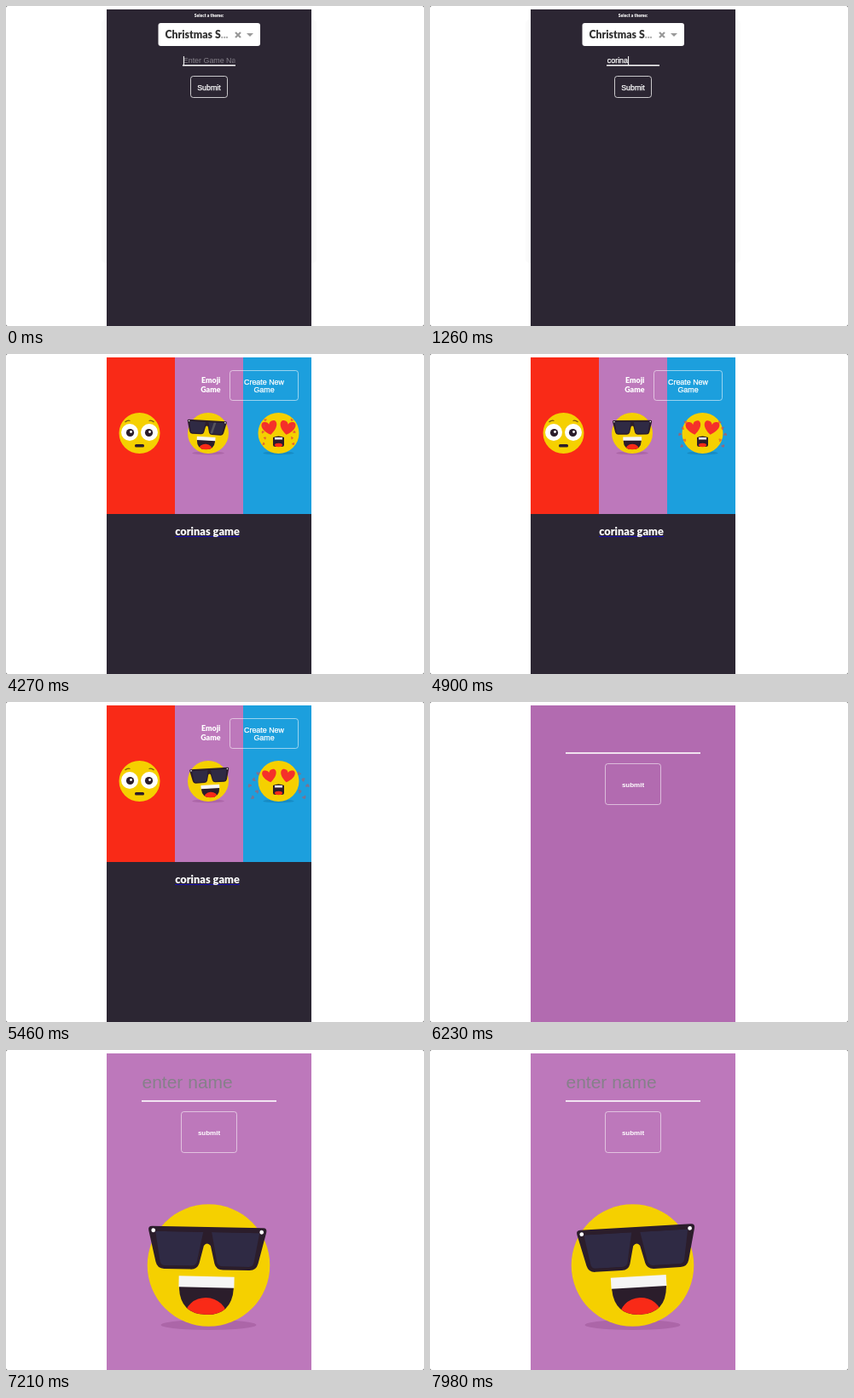
An HTML page that plays this animation: 490x376 px, repeating every 8000 ms.

```html
<!DOCTYPE html>
<html lang="en">
<head>
<meta charset="utf-8">
<title>Emoji game</title>
<style>
  html, body { margin: 0; width: 490px; height: 376px; overflow: hidden; background: #fff; }
  svg { display: block; }
  text { font-family: "Liberation Sans", Arial, sans-serif; font-size: 8.9px; fill: #fff; white-space: pre; }
  .ui { stroke: #fff; stroke-width: .25; }
  .round { font-family: Lato, "Open Sans", sans-serif; font-weight: 900; }
  .mid { text-anchor: middle; }
  .box { fill: none; stroke: #fff; }
</style>
</head>
<body>
<svg width="490" height="376" viewBox="0 0 490 376">
  <defs>
    <path id="lens" d="M-61-39H-5L-12-3Q-14 1-19 1H-49Q-54 1-55-4Z"/>
    <clipPath id="lenses">
      <use href="#lens"/>
      <use href="#lens" transform="scale(-1 1)"/>
    </clipPath>
    <clipPath id="mouth"><path d="M-32 24H32V27Q30 58 0 58T-32 27Z"/></clipPath>
    <clipPath id="bluePanel"><rect x="278" y="4" width="80" height="184"/></clipPath>
    <path id="heart" d="M0 8C-12 0-9-8-4.5-7Q-1-7 0-3.5Q1-7 4.5-7C9-8 12 0 0 8Z"/>

    <g id="cool">
      <ellipse cy="70" rx="56" ry="6" fill="#ac66a8"/>
      <circle r="71.8" fill="#f5d000"/>
      <g id="sway">
        <g clip-path="url(#mouth)">
          <rect x="-33" y="20" width="66" height="40" fill="#2b1d2b"/>
          <ellipse cy="61" rx="25" ry="23" fill="#f92a17"/>
        </g>
        <rect x="-32.5" y="13" width="65" height="13" fill="#f5f5f5"/>
        <path fill="#2b1d2b" d="M-65-45H65Q70-45 69-40L60-3Q58 5 50 5H19Q11 5 9-2L4-23Q0-28-4-23L-9-2Q-11 5-19 5H-50Q-58 5-60-3L-69-40Q-70-45-65-45Z"/>
        <g clip-path="url(#lenses)">
          <rect x="-70" y="-45" width="140" height="55" fill="#2f2a44"/>
          <path id="glint" fill="#55535c" d="M4-45H12L-3 8H-11Z"/>
        </g>
        <circle cx="-63.5" cy="-40" r="2.4" fill="#fff"/>
        <circle cx="63.5" cy="-40" r="2.4" fill="#fff"/>
      </g>
    </g>
  </defs>

  <g id="create">
    <rect x="112" y="16" width="252" height="286" rx="5" fill="#fbfbfb"/>
    <rect x="118" y="4" width="240" height="372" fill="#2c2633"/>
    <text class="round mid" x="238" y="13" style="font-size:5px">Select a theme:</text>
    <rect x="178.5" y="20" width="119.5" height="27" rx="3" fill="#fff"/>
    <text class="round" x="186.5" y="38" style="font-size:12.3px;fill:#333">Christmas S<tspan fill="#aaa">...</tspan></text>
    <path d="M269 31l6 6m0-6l-6 6" stroke="#999" stroke-width="2.2"/>
    <path d="M282 32h8l-4 4Z" fill="#999"/>
    <svg x="207" y="56" width="61.5" height="16" viewBox="207 56 61.5 16">
      <text id="hint" x="207.8" y="67" style="fill:#85818a">Enter Game Name</text>
      <text id="typed" class="ui" x="207.8" y="67"></text>
    </svg>
    <rect id="caret" y="59" width="1" height="10" fill="#fff"/>
    <rect x="207" y="69" width="62" height="1.5" fill="#fff"/>
    <rect class="box" x="216.5" y="82.5" width="43" height="25" rx="3" stroke-opacity=".75"/>
    <text class="ui mid" x="238" y="99">Submit</text>
  </g>

  <g id="home">
    <rect x="118" y="4" width="240" height="372" fill="#2c2633"/>
    <rect x="118" y="4" width="80" height="184" fill="#f92a17"/>
    <rect x="198" y="4" width="80" height="184" fill="#bd78bb"/>
    <rect x="278" y="4" width="80" height="184" fill="#1c9fdd"/>

    <g transform="translate(156.5 93)">
      <circle r="24" fill="#f5d000"/>
      <g fill="#fff"><circle cx="-11.5" cy="-1" r="10"/><circle cx="11.5" cy="-1" r="10"/></g>
      <g fill="#2b1d2b"><circle cx="-11" cy="-.5" r="4.6"/><circle cx="11" cy="-.5" r="4.6"/>
        <rect x="-5.5" y="13" width="11" height="3.6" rx="1.6"/></g>
      <g fill="#fff"><circle cx="-10" cy="-1.5" r="1.4"/><circle cx="12" cy="-1.5" r="1.4"/></g>
      <path d="M-17-13q3-2.5 6-1.500M17-13q-3-2.500-6-1.500" fill="none" stroke="#7a5a10" stroke-width="1.2"/>
    </g>

    <use href="#cool" transform="translate(237 93) scale(.334)"/>

    <g clip-path="url(#bluePanel)">
      <g transform="translate(319.5 93)">
        <ellipse cy="23.400" rx="18" ry="2" fill="#178bc4"/>
        <circle r="24" fill="#f5d000"/>
        <path d="M-6.500 5Q0 2 6.500 5V14Q6.500 16 4 16H-4Q-6.500 16-6.500 14Z" fill="#2b1d2b"/>
        <rect x="-4.500" y="5" width="9" height="2.500" fill="#f5f5f5"/>
        <ellipse cy="14" rx="4.500" ry="2.200" fill="#f92a17"/>
        <g id="eyes" fill="#f5302a"></g>
        <g id="sparks" fill="#e0453f"></g>
      </g>
    </g>

    <g class="round" text-anchor="end">
      <text class="round" x="251.500" y="33.500">Emoji</text>
      <text class="round" x="251.500" y="44.500">Game</text>
    </g>
    <rect class="box" x="262.500" y="19.500" width="80" height="35" rx="3" stroke-opacity=".55"/>
    <text class="ui mid" x="302.500" y="36">Create New</text>
    <text class="ui mid" x="302.500" y="45">Game</text>
    <path d="M198 214.500H274" stroke="#1a0fb0"/>
    <text class="round mid" x="236" y="213" style="font-size:12.800px">corinas game</text>
  </g>

  <g id="join">
    <rect id="joinBack" x="118" y="4" width="240" height="372"/>
    <g id="loaded">
      <text x="159.500" y="45" style="font-size:21px;fill:#86808a">enter name</text>
      <use href="#cool" transform="translate(237.500 253)"/>
    </g>
    <rect x="159" y="59.200" width="158" height="1.600" fill="#fff"/>
    <rect class="box" x="205.500" y="72.500" width="65" height="48" rx="3" stroke-opacity=".55"/>
    <text class="mid" x="238" y="100" style="font-size:8px;font-weight:bold">submit</text>
  </g>

  <path d="M0 0H2Q0 0 0 2ZM490 0V2Q490 0 488 0ZM0 376V374Q0 376 2 376ZM490 376H488Q490 376 490 374Z" fill="#555"/>
</svg>
<script>
  const LOOP = 8000, HOME = 4270, JOIN = 6230, LOADED = 6300, SWAY = 2480;
  const NAME = "corinas game";
  const KEYS = [280, 350, 700, 840, 1050, 1260, 1680, 1820, 1960, 2310, 2590, 2870];
  const SPARKS = 10;

  const $ = id => document.getElementById(id);
  const show = (id, on) => $(id).setAttribute("display", on ? "inline" : "none");
  const place = (el, transform) => el.setAttribute("transform", transform);

  function addHearts(parent, count) {
    return Array.from({ length: count }, () => {
      const heart = document.createElementNS("http://www.w3.org/2000/svg", "use");
      heart.setAttribute("href", "#heart");
      return $(parent).appendChild(heart);
    });
  }
  const eyes = addHearts("eyes", 2), sparks = addHearts("sparks", SPARKS);

  function drawCreate(t) {
    const count = KEYS.filter(k => k <= t).length;
    $("typed").textContent = NAME.slice(0, count);
    show("hint", !count);
    show("caret", t < 3360 || t >= 3920);
    $("caret").setAttribute("x", 207.9 + (count ? $("typed").getComputedTextLength() : 0));
  }

  function drawCool(t) {
    const turn = (t - 4250) / SWAY;
    const c = Math.cos(turn * 2 * Math.PI);
    place($("sway"), `translate(${-6 * c}) rotate(${3.3 * c})`);
    const sinceGlint = (turn - Math.round(turn)) * SWAY;
    place($("glint"), `translate(${16 + sinceGlint * 0.28})`);
  }

  function drawHearts(t) {
    const pulse = 1 + 0.06 * Math.cos((t - HOME) * Math.PI / 350);
    eyes.forEach((eye, i) => {
      const side = i ? 1 : -1;
      place(eye, `translate(${side * 10.5} -6.5) rotate(${side * 10}) scale(${pulse})`);
    });
    const p = ((t - HOME) / 2000 + 0.25) % 1;
    sparks.forEach((spark, i) => {
      const side = i % 2 ? 1 : -1, row = Math.floor(i / 2);
      const x = side * (12 + p * (14 + row * 4 % 11 * 1.5));
      const y = -16 + row * 7 + 10 * p * p;
      place(spark, `translate(${x} ${y}) rotate(${i * 37}) scale(${0.16 + 0.12 * p})`);
    });
    $("sparks").setAttribute("opacity", 0.9 - 0.5 * p);
  }

  function draw(t) {
    show("create", t < HOME);
    show("home", t >= HOME && t < JOIN);
    show("join", t >= JOIN);
    show("loaded", t >= LOADED);
    $("joinBack").setAttribute("fill", t < LOADED ? "#b26bb0" : "#bd78bb");
    if (t < HOME) return drawCreate(t);
    drawCool(t);
    if (t < JOIN) drawHearts(t);
  }

  const start = performance.now();
  function tick() {
    draw((performance.now() - start) % LOOP);
    requestAnimationFrame(tick);
  }
  tick();
</script>
</body>
</html>
```
